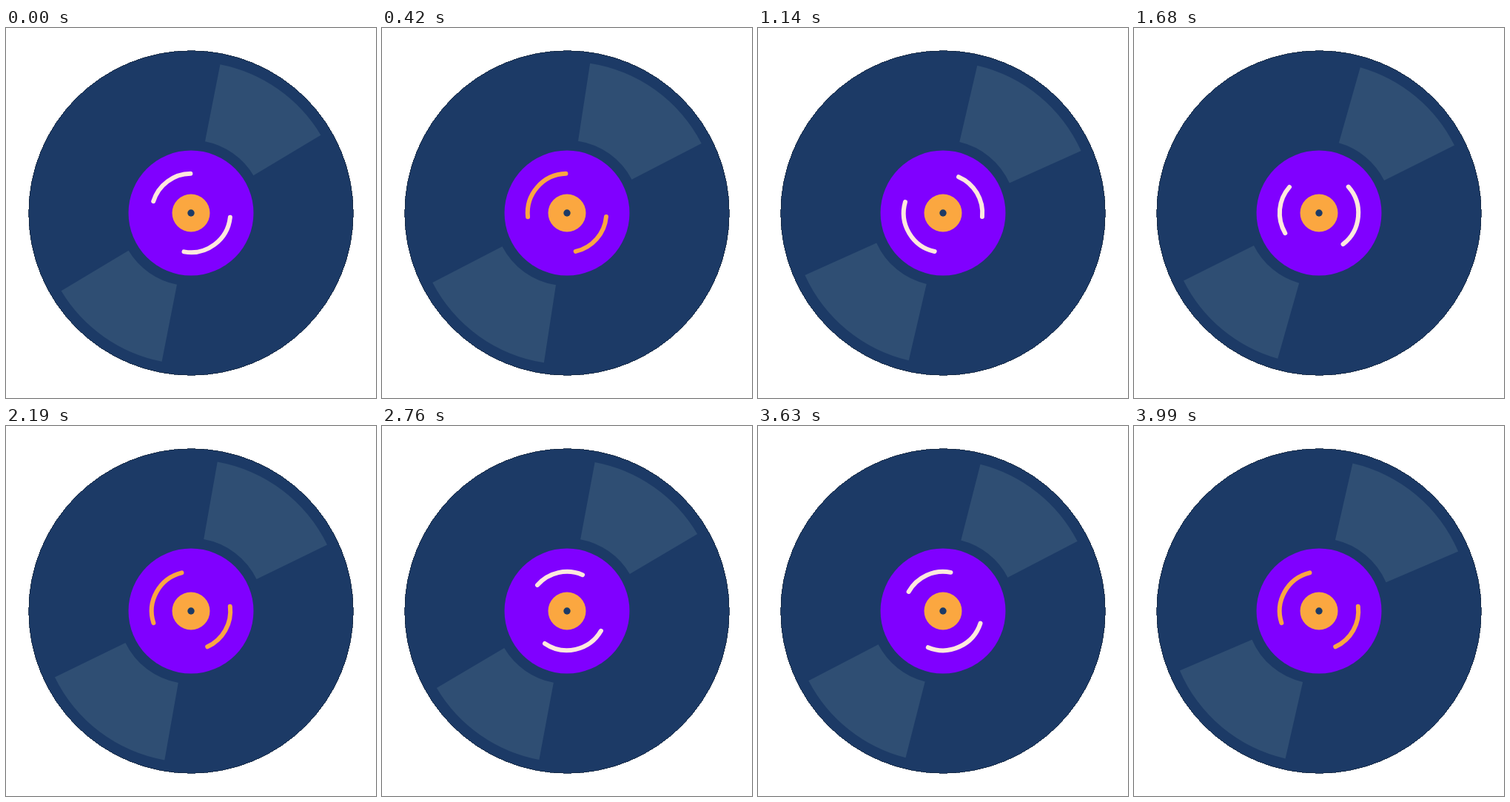
These frames come from a looping animation (500x500 px, 4.02 s). An HTML page:

```html
<!DOCTYPE html>
<html lang="en">
<head>
<meta charset="utf-8">
<title>Spinning record</title>
<style>
  html, body { margin: 0; width: 100%; height: 100%; overflow: hidden; background: #fff; }
  svg { display: block; width: 100vw; height: 100vh; }
</style>
</head>
<body>
<svg viewBox="0 0 500 500">
  <g transform="translate(250 250)">
    <circle r="219.3" fill="#1c3a66" stroke="#10223c" stroke-width=".8" shape-rendering="crispEdges"/>
    <path id="shine" fill="#2f4e73"/>
    <circle r="84.5" fill="#8000ff"/>
    <path id="arcs" fill="none" stroke-width="6" stroke-linecap="round"/>
    <circle r="25.5" fill="#fba740"/>
    <circle r="4.7" fill="#1c3a66"/>
  </g>
</svg>
<script>
const STEP = 30, STEPS = 134, TURN = 30;
const CREAM = '#ffe8de', ORANGE = '#fba740';
const shine = document.getElementById('shine');
const arcs = document.getElementById('arcs');

const wave = (n, peak, period) => Math.cos(2 * Math.PI * (n - peak) / period);

function point(radius, degrees) {
  const a = degrees * Math.PI / 180;
  return `${(radius * Math.cos(a)).toFixed(2)} ${(radius * Math.sin(a)).toFixed(2)}`;
}

function arc(radius, middle, span) {
  const from = point(radius, middle - span / 2), to = point(radius, middle + span / 2);
  return `M${from}A${radius} ${radius} 0 0 1 ${to}`;
}

function wedge(inner, outer, middle, span) {
  const back = point(inner, middle + span / 2), end = point(inner, middle - span / 2);
  return `${arc(outer, middle, span)}L${back}A${inner} ${inner} 0 0 0 ${end}Z`;
}

function draw(n) {
  // The reflection sways slowly and breathes once per turn.
  const middle = -52.5 + 2.5 * wave(n, 48, 90);
  const span = 50.75 + 3.3 * wave(n, 12.5, TURN);
  shine.setAttribute('d', wedge(98.5, 204.6, middle, span) + wedge(98.5, 204.6, middle + 180, span));

  const spin = -126.7 + n * 360 / TURN;
  arcs.setAttribute('d', arc(53.2, spin, 72) + arc(53.2, spin + 180, 94));
  const phase = n % TURN;
  arcs.setAttribute('stroke', phase >= 11 && phase < 26 ? ORANGE : CREAM);
}

const start = performance.now();
function tick() {
  draw(Math.floor((performance.now() - start) / STEP) % STEPS);
  requestAnimationFrame(tick);
}
tick();
</script>
</body>
</html>
```
